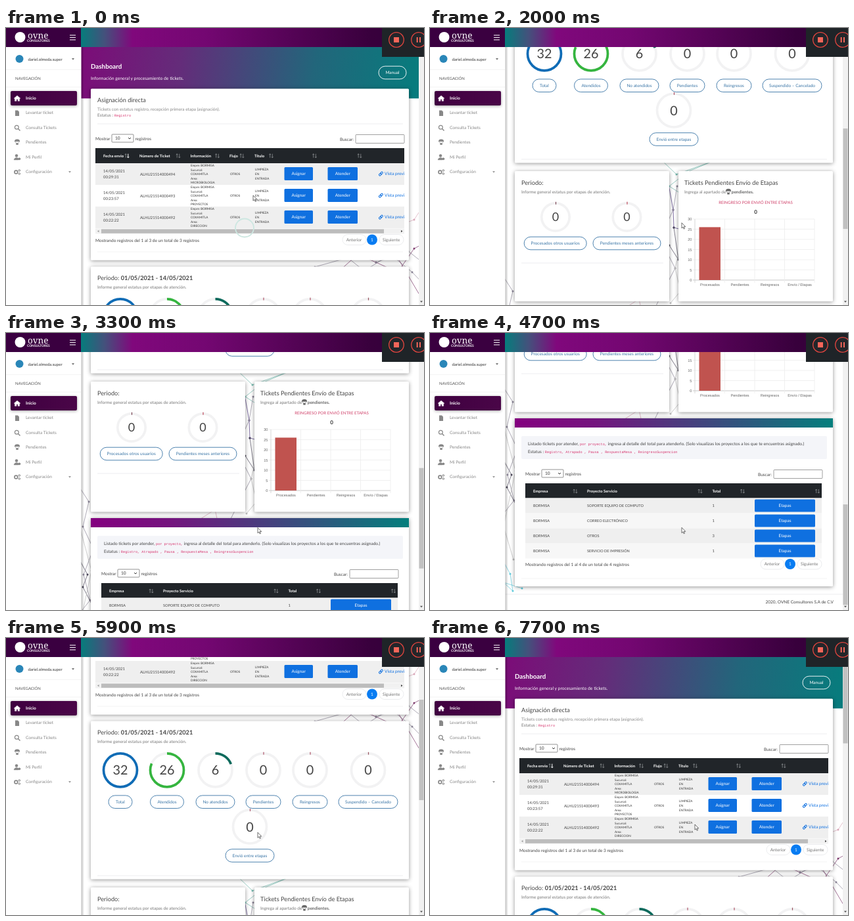
Recreate the animation shown at these times as an HTML page. Size 636 by 422 pixels, loop 7800 ms.

```html
<!DOCTYPE html>
<html lang="es">
<head>
<meta charset="utf-8">
<title>Dashboard</title>
<style>
html, body { margin: 0; width: 100%; height: 100%; overflow: hidden; background: #fff; }
svg { display: block; width: 636px; height: 422px; font-family: Lato, sans-serif; }
text { white-space: pre; text-rendering: geometricPrecision; }
.card { fill: #fff; filter: drop-shadow(0 1.5px 3px rgba(0,0,0,.42)); }
.code { font: 5.25px "Liberation Mono", monospace; fill: #d6336c; }
.axis { font-family: "Liberation Sans", Arial, sans-serif; }
.b { font-weight: 700; }
</style>
</head>
<body>
<svg id="stage" viewBox="0 0 636 422">
  <defs>
    <linearGradient id="hero" x2="1" y2=".02"><stop stop-color="#7c0c78"/><stop offset=".3" stop-color="#642c7a"/><stop offset=".7" stop-color="#22667b"/><stop offset="1" stop-color="#087b7d"/></linearGradient>
    <linearGradient id="strip"><stop stop-color="#84007f"/><stop offset=".25" stop-color="#74147e"/><stop offset="1" stop-color="#047f7d"/></linearGradient>
    <linearGradient id="bar"><stop stop-color="#067c7c"/><stop offset=".07" stop-color="#45507c"/><stop offset=".15" stop-color="#80087c"/><stop offset=".36" stop-color="#740772"/><stop offset=".85" stop-color="#38003c"/><stop offset="1" stop-color="#30003a"/></linearGradient>
    <linearGradient id="active"><stop stop-color="#3f0040"/><stop offset="1" stop-color="#4a0648"/></linearGradient>
    <linearGradient id="edge"><stop stop-color="#000" stop-opacity=".28"/><stop offset="1" stop-color="#000" stop-opacity="0"/></linearGradient>
  </defs>
</svg>
<script>
const GRAY = '#777', INK = '#444', BLUE = '#0f70e0', FIRM = 'BORMISA';
const text = (x, y, s, size = 6.53, fill = GRAY, attrs = '') =>
  `<text x="${x}" y="${y}" font-size="${size}" fill="${fill}" ${attrs}>${s}</text>`;
const mid = (x, y, s, size, fill, attrs = '') => text(x, y, s, size, fill, 'text-anchor="middle" ' + attrs);
const bold = (x, y, s, size, fill) => text(x, y, s, size, fill, 'class="b"');
const rect = (x, y, w, h, fill, attrs = '') =>
  `<rect x="${x}" y="${y}" width="${w}" height="${h}" fill="${fill}" ${attrs}/>`;
const path = (d, stroke, w = 1, fill = 'none') =>
  `<path d="${d}" stroke="${stroke}" stroke-width="${w}" fill="${fill}"/>`;
const disc = (x, y, r, fill, attrs = '') => `<circle cx="${x}" cy="${y}" r="${r}" fill="${fill}" ${attrs}/>`;
const rule = (x1, x2, y, c = '#e9e9ec') => path(`M${x1} ${y}H${x2}`, c, .8);
const each = (list, fn) => list.map(fn).join('');
const card = (x, y, w, h) => rect(x, y, w, h, '#fff', 'class="card" rx="1.5"');
const button = (x, y, w, h, s) => rect(x, y, w, h, BLUE, 'rx="1.5"') + mid(x + w / 2, y + h / 2 + 2.2, s, 6.53, '#fff');
const pill = (cx, cy, w, s, c = '#3a75a6', fill = '#fff') =>
  rect(cx - w / 2, cy - 9.8, w, 19.6, fill, `rx="9.8" stroke="${c}" stroke-width=".9"`) +
  mid(cx, cy + 2.2, s, 6.5, c);

// Ring gauge with a share of 0 shown as a thin tick
function gauge(cx, cy, r, n, share, color) {
  const len = 2 * Math.PI * r;
  const arc = share
    ? disc(cx, cy, r, 'none', `stroke="${color}" stroke-width="3.7" stroke-dasharray="${share * len} ${len}" transform="rotate(-90 ${cx} ${cy})"`)
    : path(`M${cx + .5} ${cy - r - 2}v4`, color, 1.2);
  return disc(cx, cy, r, 'none', 'stroke="#f2f2f3" stroke-width="3.7"') + arc +
    mid(cx, cy + r * .275, n, r > 23 ? 19.8 : 18, INK);
}

const sorter = (x, y) => path(`M${x - 1.8} ${y + 3}v-6m-1.4 1.6l1.4-1.6 1.4 1.6M${x + 1.8} ${y - 3}v6m-1.4-1.6l1.4 1.6 1.4-1.6`, '#9a9da0', .7);

function controls(x, y, searchX) {
  return text(x, y + 9.3, 'Mostrar', 6.53, INK) +
    rect(x + 25, y, 33, 12, '#fff', 'rx="1" stroke="#777" stroke-width=".8"') +
    text(x + 30, y + 8.4, '10', 6.6, '#333') +
    path(`M${x + 50} ${y + 5}l2 2 2-2`, '#333') +
    text(x + 60.5, y + 9.3, 'registros', 6.53, INK) +
    text(searchX, y + 9.5, 'Buscar:', 6.53, INK) +
    rect(searchX + 24, y + .5, 74, 13, '#fff', 'rx="1" stroke="#888" stroke-width=".8"');
}

function pager(cx, y) {
  return rect(cx - 45, y - 8, 36, 16, '#fff', 'rx="8" stroke="#e6e7ea" stroke-width=".8"') +
    rect(cx + 11, y - 8, 37, 16, '#fff', 'rx="8" stroke="#e6e7ea" stroke-width=".8"') +
    mid(cx - 27.5, y + 2.2, 'Anterior') + mid(cx + 29.2, y + 2.2, 'Siguiente') +
    disc(cx, y, 8, '#087cf2') + mid(cx, y + 2.2, '1', 6.5, '#fff');
}

const parachute = (x, y, c) =>
  path(`M${x - 4} ${y - 1}a4 3.4 0 0 1 8 0z`, c, .3, c) +
  path(`M${x - 3.5} ${y - 1}l2.5 3m4.5-3l-2.5 3`, c, .6) + rect(x - 1.7, y + 1.2, 3.4, 2.8, c);

function net(color, ...pts) {
  return path('M' + pts.map(p => p.join(' ')).join('L'), color, .7) + each(pts, p => disc(...p, 1.5, color));
}

function backdrop() {
  const plum = '#7d3a6c', slate = '#8d8799', teal = '#74b9ae', pink = '#d9a6b8';
  return net(plum, [505, 372], [535, 345], [563, 357], [596, 372], [621, 336], [640, 326]) +
    net(slate, [470, 364], [520, 350], [545, 370], [585, 345], [618, 372], [640, 395]) +
    net(slate, [563, 357], [612, 340], [640, 362]) +
    net(pink, [600, 300], [621, 292], [634, 272]) +
    net(plum, [596, 350], [640, 425]) +
    net(teal, [352, 600], [375, 622], [430, 602], [392, 618], [364, 640], [395, 660]) +
    net('#49337c', [362, 632], [370, 676], [371, 703], [390, 708]) +
    net(slate, [376, 640], [370, 676], [350, 720], [373, 765], [360, 790], [340, 830]) +
    net('#4a4658', [371, 703], [378, 752], [364, 730]) +
    net('#bbb', [380, 735], [373, 765], [381, 800], [366, 818]) +
    net(pink, [290, 830], [318, 812], [322, 830]) +
    net(slate, [108, 772], [126, 800], [117, 838], [133, 872], [118, 911], [128, 950], [108, 975]) +
    net('#4a4658', [110, 885], [124, 911], [117, 930], [135, 965]) +
    net('#bbb', [110, 830], [130, 905], [112, 990], [127, 1040]) +
    net('#62cbdc', [110, 1040], [122, 1062], [126, 1088], [112, 1075], [140, 1084]);
}

function assignCard() {
  const areas = ['MICROBIOLOGIA', 'PROYECTOS', 'DIRECCION'], hours = ['29:31', '23:57', '22:22'];
  const heads = [[148, 'Fecha envio'], [203, 'Número de Ticket'], [280.5, 'Información'], [340, 'Flujo'], [378, 'Título']];
  const row = (area, i) => {
    const y = 206 + 33 * i, lines = (x, y0, list) => each(list, (s, k) => text(x, y0 + k * 6.6, s, 4.6, '#333'));
    return rect(136, y, 470, 33, i % 2 ? '#fff' : '#efefef') +
      text(148, y + 14, '14/05/2021', 5.95, INK) + text(148, y + 23, '00:' + hours[i], 5.95, INK) +
      text(204, y + 18.5, 'ALHU2151400049' + (4 - i), 5.9, INK) +
      lines(281, y + 4.9, ['Empre: ' + FIRM, 'Sucursal:', 'COXAMITLA', 'Area:', area]) +
      lines(341, y + 18, ['OTROS']) + lines(379, y + 11.4, ['LIMPIEZA', 'EN', 'ENTRADA']) +
      button(423.5, y + 6, 43.5, 20, 'Asignar') + button(489.5, y + 6, 45.5, 20, 'Atender') +
      `<g transform="rotate(-45 570.5 ${y + 16})">` +
      rect(566.8, y + 14.6, 4, 2.8, 'none', `rx="1.4" stroke="${BLUE}"`) +
      rect(570, y + 14.6, 4, 2.8, 'none', `rx="1.4" stroke="${BLUE}"`) + '</g>' +
      text(576, y + 18.4, 'Vista previ', 6.53, BLUE);
  };
  return card(129, 92.5, 484, 261.3) + text(139, 112.5, 'Asignación directa', 9.2, INK) +
    text(139, 126, 'Tickets con estatus registro, recepción primera etapa (asignación).', 6.53, '#888') +
    text(139, 135.3, 'Estatus : <tspan class="code">Registro</tspan>') + rule(139, 604, 146) +
    controls(136, 162, 508) + rect(136, 183, 470, 23, '#212529') +
    each(heads, ([x, s]) => bold(x, 196.7, s, 5.9, '#fff')) +
    each([184, 262, 321.5, 359, 403.5, 469.5, 538], x => sorter(x, 194.7)) +
    path('M185.8 191.7v6m-1.4-1.6l1.4 1.6 1.4-1.6', '#fff', .8) + each(areas, row) +
    rect(136, 305.5, 470, 8, '#f1f1f1') + rect(145, 306.5, 430, 6.3, '#bcbcbc') +
    path('M141.5 308l-2.5 1.6 2.5 1.6z', 'none', 0, '#999') + path('M601 308l2.5 1.6-2.5 1.6z', 'none', 0, '#444') +
    text(136, 325.5, 'Mostrando registros del 1 al 3 de un total de 3 registros', 6.53, INK) +
    pager(557, 322.5) + rule(139, 604, 341, '#f0f0f2');
}

function periodCard() {
  const tick = '#b0566a';
  const items = [
    [174, 32, 1, '#0f6cb6', 36, 'Total'], [245, 26, .81, '#35b53f', 51, 'Atendidos'],
    [318.5, 6, .19, '#0d6a5c', 59, 'No atendidos'], [391.5, 0, 0, tick, 53, 'Pendientes'],
    [462.5, 0, 0, tick, 53, 'Reingresos'], [551, 0, 0, '#9a5560', 90, 'Suspendido – Cancelado']];
  return card(129, 363.5, 484, 241) +
    text(139, 383.7, 'Periodo: <tspan class="b">01/05/2021 - 14/05/2021</tspan>', 9.15, INK) +
    text(139, 397, 'Informe general estatus por etapas de atención.') +
    each(items, ([x, n, share, c, w, s]) => gauge(x, 438.3, 25.5, n, share, c) + pill(x, 486.7, w, s)) +
    gauge(371, 524.5, 25.5, 0, 0, tick) + pill(371, 568.5, 74, 'Envió entre etapas') + rule(139, 604, 599);
}

function smallCards() {
  const axisText = (x, y, s, anchor) => text(x, y, s, 5.65, '#666', `class="axis" text-anchor="${anchor}"`);
  const cats = ['Procesados', 'Pendientes', 'Reingresos', 'Envío / Etapas'];
  let grid = '';
  for (let i = 0; i <= 6; i++) grid += rule(400, 585, 783 - 15.5 * i, i ? '#ececec' : '#bbb') + axisText(398.5, 785 - 15.5 * i, i * 5, 'end');
  for (let i = 0; i <= 4; i++) grid += path(`M${403 + 45.5 * i} 690V787`, i ? '#ececec' : '#ccc', .8);
  return card(129, 617, 235, 198.5) + text(139, 637.8, 'Periodo:', 9.2, INK) +
    text(139, 651, 'Informe general estatus por etapas de atención.') +
    gauge(191, 687, 21.2, 0, 0, '#7e4858') + gauge(299.5, 687, 21.2, 0, 0, '#c04a5c') +
    pill(190.7, 727, 95, 'Procesados otros usuarios') + pill(299.5, 727, 103, 'Pendientes meses anteriores') +
    rule(139, 355, 757) +
    card(378, 617, 235, 198.5) + text(387, 637.8, 'Tickets Pendientes Envío de Etapas', 9.25, INK) +
    text(387, 651, 'Ingrega al apartado de') + parachute(454, 648.5, '#666') + bold(458.7, 651, 'pendientes.', 6.53, '#666') +
    mid(495.5, 666.5, 'REINGRESO POR ENVIÓ ENTRE ETAPAS', 6.13, '#cf3f68') +
    mid(495.5, 681.5, '0', 8, '#333', 'class="b"') + grid +
    rect(409.5, 702.4, 32.5, 80.6, '#c0534f') +
    each(cats, (s, i) => axisText(426 + 45.5 * i, 792, s, 'middle'));
}

function projectCard() {
  const rows = [['SOPORTE EQUIPO DE COMPUTO', 1], ['CORREO ELECTRÓNICO', 1], ['OTROS', 3], ['SERVICIO DE IMPRESIÓN', 1]];
  const row = ([name, n], i) => {
    const y = 946.5 + 23 * i;
    return rect(145, y, 451, 23, i % 2 ? '#f7f7f7' : '#efefef') + text(157, y + 13.7, FIRM, 5.6, INK) +
      text(239, y + 13.7, name, 5.55, INK) + text(429.5, y + 13.7, n, 5.8, INK) + button(494, y + 2, 92, 19, 'Etapas');
  };
  return card(129, 825, 484, 256) + rect(129, 825, 484, 14, 'url(#strip)') +
    rect(139, 852, 465, 35, '#f4f5f9', 'rx="2"') +
    text(149, 866.3, 'Listado tickets por atender, <tspan class="code">por proyecto,</tspan> ingresa al detalle del total para atenderlo. (Solo visualizas los proyectos a los que te encuentras asignado.)', 6.53, INK) +
    text(149, 878.3, 'Estatus : <tspan class="code">Registro, Atrapado , Pausa , RespuestaMesa , ReingresoSuspencion</tspan>', 6.53, INK) +
    controls(145, 903, 499) + rect(145, 924, 451, 22.5, '#212529') +
    each([[157, 'Empresa'], [239, 'Proyecto Servicio'], [429.5, 'Total']], ([x, s]) => bold(x, 937.5, s, 5.9, '#fff')) +
    each([221, 411, 475.5, 589.5], x => sorter(x, 936)) + each(rows, row) +
    text(145, 1049.8, 'Mostrando registros del 1 al 4 de un total de 4 registros', 6.53, INK) +
    pager(548, 1047) + rule(139, 604, 1069, '#f0f0f2') +
    rect(114, 1093, 514, 30, '#fff') + rule(114, 628, 1093) +
    text(614, 1106.5, '2020, OVNE Consultores S.A de C.V', 6.53, INK, 'text-anchor="end"');
}

const hero = rect(114, 29, 514, 78.3, 'url(#hero)') + bold(129, 61.8, 'Dashboard', 9.8, '#fff') +
  text(129, 78.8, 'Información general y procesamiento de tickets.', 6.78, '#fff') +
  pill(588, 68, 42, 'Manual', '#fff', 'none');

function sidebar() {
  const c = '#888', names = ['Levantar ticket', 'Consulta Tickets', 'Pendientes', 'Mi Perfil', 'Configuración'];
  return rect(114, 29, 5, 393, 'url(#edge)') + rect(0, 0, 114.5, 422, '#fff') +
    disc(20.5, 47, 6, '#2a86b8') + text(33.5, 49.6, 'dariel.olmeda.super', 6.1, '#333') +
    path('M100 46.2h4l-2 2.2z', 'none', 0, '#555') + rule(0, 114, 63.5, '#f0f0f0') +
    text(14, 79.2, 'NAVEGACIÓN', 5.95, '#555') + rule(0, 114, 90, '#f0f0f0') +
    rect(7, 96, 101, 22, 'url(#active)', 'rx="2" style="filter:drop-shadow(0 1px 2px rgba(0,0,0,.35))"') +
    path('M12 107.3l5-4.4 5 4.4h-1.4v4h-2.6v-2.8h-2v2.8h-2.6v-4z', '#fff', .4, '#fff') + bold(30, 109.2, 'Inicio', 6.53, '#fff') +
    each(names, (s, i) => text(30, 131.4 + 22.4 * i, s, 6.53, c)) +
    path('M14 125.5h4l2 2v6.5h-6z', 'none', 0, c) +
    disc(16.3, 151.3, 2.9, 'none', `stroke="${c}" stroke-width="1.2"`) + path('M18.5 153.5l3 3', c, 1.4) +
    parachute(17, 174, c) +
    disc(16, 194.5, 2.2, c) + path('M12 201a4 3.6 0 0 1 7 -2.2v2.2z', c, .4, c) + disc(20.3, 199.3, 1.9, c) +
    disc(15.3, 219.5, 2.4, 'none', `stroke="${c}" stroke-width="1.6"`) +
    each([217, 222], y => disc(20.3, y, 1.3, 'none', `stroke="${c}"`)) +
    path('M95 218.3h4l-2 2.2z', 'none', 0, c);
}

const header = rect(0, 0, 114.5, 29, '#3a0040') + rect(114, 0, 522, 29, 'url(#bar)') + disc(21.5, 14, 8, '#fff') +
  text(33, 16, 'ovne', 13.5, '#fff', 'font-family="Noto Serif, serif"') + bold(32, 21, 'CONSULTORES', 4.9, '#fff') +
  path('M97 11h9m-9 3.5h9m-9 3.5h9', '#fff', 1.1);

const recorder = rect(572, 0, 64, 44, '#1f2428') +
  each([594, 628], x => disc(x, 18, 11.3, '#24262a', 'stroke="#e2453f" stroke-width="1.3"')) +
  rect(590, 14, 8, 8, '#f4665a') + rect(624.7, 14, 2, 8, '#f4665a') + rect(629, 14, 2, 8, '#f4665a');

const stage = document.getElementById('stage');
stage.innerHTML += rect(0, 0, 636, 422, '#fff') +
  `<g id="page">${backdrop()}${hero}${assignCard()}${periodCard()}${smallCards()}${projectCard()}</g>` +
  sidebar() + rect(628, 29, 8, 393, '#f1f1f1') + rect(628.5, 0, 7, 153, '#c1c1c1', 'id="thumb"') +
  path('M630 415.8h4l-2 2.4z', 'none', 0, '#555') + header + recorder +
  disc(363, 304.5, 14, 'none', 'id="ripple" stroke="#cde7e1" stroke-width="1.8"') +
  `<g id="cursor">${path('M0 0v8.2l1.9-1.7 1.3 2.9 1.3-.6-1.3-2.8h2.6z', '#333', .7, '#fff')}</g>`;
const [page, thumb, ripple, cursor] = ['page', 'thumb', 'ripple', 'cursor'].map(id => document.getElementById(id));

const scrollKeys = [[0, 0], [500, 0], [2000, 399], [3300, 543], [4050, 695], [4700, 695], [5900, 237], [6500, 117], [7100, 0], [7800, 0]];
const xKeys = [[0, 376], [500, 383], [7100, 383], [7700, 403], [7800, 403]];
const yKeys = [[0, 255], [500, 297], [7100, 296], [7700, 284], [7800, 284]];

function at(keys, t) {
  const i = keys.findIndex(k => k[0] > t), [t0, a] = keys[i - 1], [t1, b] = keys[i];
  return a + (b - a) * (t - t0) / (t1 - t0);
}

function draw(now) {
  const t = Math.floor(now % 7800 / 100) * 100, y = at(scrollKeys, t);
  page.setAttribute('transform', `translate(0 ${-y})`);
  thumb.setAttribute('y', 7.5 + y * .365);
  thumb.setAttribute('opacity', t < 500 ? 0 : 1); // appears with the first scroll
  cursor.setAttribute('transform', `translate(${at(xKeys, t)} ${at(yKeys, t)})`);
  ripple.setAttribute('opacity', Math.max(0, 1 - t / 300));
  requestAnimationFrame(draw);
}
draw(performance.now());
</script>
</body>
</html>
```
